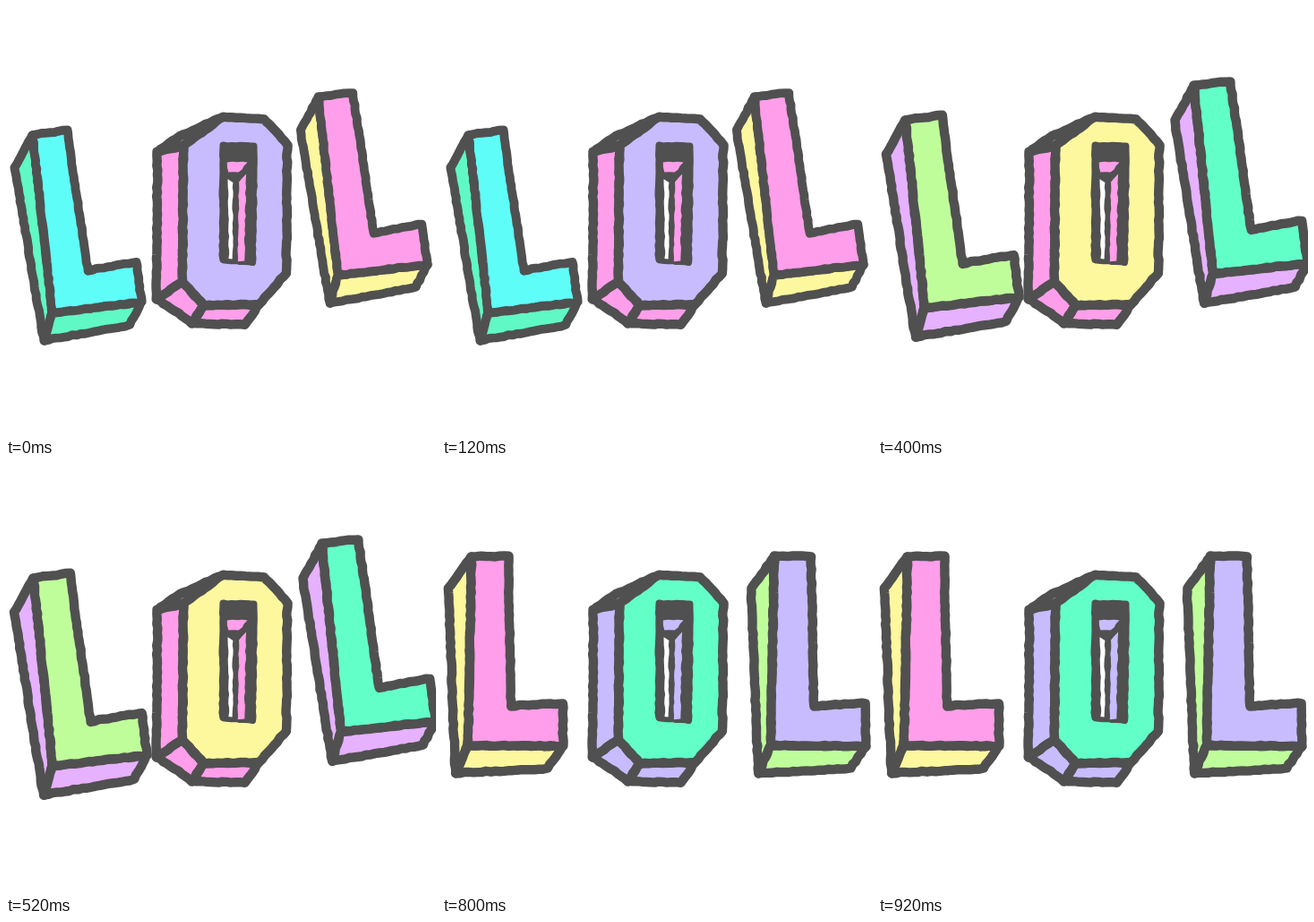
Write an HTML page that moves like this. It is 480 by 480 pixels and loops after 1 s.

```html
<!DOCTYPE html>
<html lang="en">
<head>
<meta charset="utf-8">
<title>LOL</title>
<style>
html, body { margin: 0; width: 100%; height: 100%; overflow: hidden; background: #fff; }
svg { display: block; width: 100%; height: 100%; }
polygon { stroke-linejoin: round; }
</style>
</head>
<body>
<svg id="stage" viewBox="0 0 480 480"></svg>
<script>
const NS = 'http://www.w3.org/2000/svg';
const INK = '#505050', PEN = 10.4, STEP = 200;
const PINK = '#ff9eea', YELLOW = '#fdf79e', LILAC = '#c8bcff', MINT = '#62ffc8',
  CYAN = '#5ffdf8', LIME = '#bffd9a', VIOLET = '#e6b1ff', ROSE = '#ffbade', SEA = '#60f8c4';

// Corners along the middle of the pen line; each back corner belongs to the front corner of the same index
const L = {
  front: '33,103 29,314 135,315 135,267 77,270 74,103',
  back: '7,139 15,345 118,340'
};
const O = {
  front: '242,124 198,156 197,308 221,334 283,333 313,298 314,155 288,126',
  back: '194,145 169,163 168,327 208,354 266,356',
  hole: '242,156 277,156 275,286 242,283',
  inside: ['247,174 269,174 260,186 248,185', '260,197 268,188 266,285 259,285'],
  gap: '248,193 253,197 253,283 249,282'
};

// Anchor, turn in degrees, scale, and offset to the last letter
const SWAY = { x: 29, y: 139, turn: -7.4, size: .948, dx: 319, dy: -42 };
const REST = { x: 33, y: 98, turn: 0, size: 1, dx: 338, dy: 0 };
const LIFT = { x: 30, y: 122, turn: -6.9, size: 1, dx: 322, dy: -38 };
const LEAN = { x: 55, y: 78, turn: 5.6, size: .993, dx: 329, dy: 38 };

const candy = { pose: REST, colors: [PINK, YELLOW, MINT, LILAC, LILAC, LIME] };
const steps = [
  { pose: SWAY, colors: [CYAN, SEA, LILAC, PINK, PINK, YELLOW] },
  candy,
  { pose: LIFT, colors: [LIME, VIOLET, YELLOW, PINK, MINT, VIOLET] },
  { pose: LEAN, colors: [YELLOW, LILAC, ROSE, CYAN, CYAN, LIME] },
  candy
];

let seed = 7;
function rand() {
  seed = (seed * 16807) % 2147483647;
  return seed / 2147483647;
}

const parse = text => text.split(' ').map(p => p.split(',').map(Number));

// Break straight edges into short, slightly uneven strokes
function rough(pts, amount = 1.3) {
  const shake = () => (rand() - .5) * amount;
  return pts.flatMap(([x, y], i) => {
    const [nx, ny] = pts[(i + 1) % pts.length];
    const n = Math.max(1, Math.round(Math.hypot(nx - x, ny - y) / 5));
    return Array.from({ length: n }, (_, k) =>
      [x + (nx - x) * k / n + shake(), y + (ny - y) * k / n + shake()].map(v => v.toFixed(1)).join());
  }).join(' ');
}

function add(parent, tag, attrs = {}) {
  const el = document.createElementNS(NS, tag);
  for (const key in attrs) el.setAttribute(key, attrs[key]);
  return parent.appendChild(el);
}

function letter(shape) {
  const g = add(document.getElementById('stage'), 'g');
  const draw = (pts, pen = 0, fill = INK) =>
    add(g, 'polygon', { points: rough(pts), fill, stroke: INK, 'stroke-width': pen });
  const front = parse(shape.front), back = parse(shape.back);
  const sides = back.slice(1).map((p, i) => draw([front[i], front[i + 1], p, back[i]], PEN));
  const face = draw(front, PEN);
  if (shape.hole) {
    draw(parse(shape.hole), 8);
    sides.push(...shape.inside.map(p => draw(parse(p))));
    draw(parse(shape.gap), 0, '#fff');
  }
  return {
    g,
    paint(a, b) {
      face.setAttribute('fill', a);
      sides.forEach(s => s.setAttribute('fill', b));
    }
  };
}

const letters = [L, O, L].map(letter);

function place(item, pose, dx, dy) {
  item.g.setAttribute('transform',
    `translate(${pose.x + dx} ${pose.y + dy}) rotate(${pose.turn}) scale(${pose.size}) translate(-33 -98)`);
}

function render(ms) {
  const { pose, colors } = steps[Math.floor(ms / STEP) % steps.length];
  letters.forEach((item, i) => item.paint(colors[2 * i], colors[2 * i + 1]));
  place(letters[0], pose, 0, 0);
  place(letters[2], pose, pose.dx, pose.dy);
}

let start;
function tick(now) {
  start ??= now;
  render(now - start);
  requestAnimationFrame(tick);
}
render(0);
requestAnimationFrame(tick);
</script>
</body>
</html>
```
